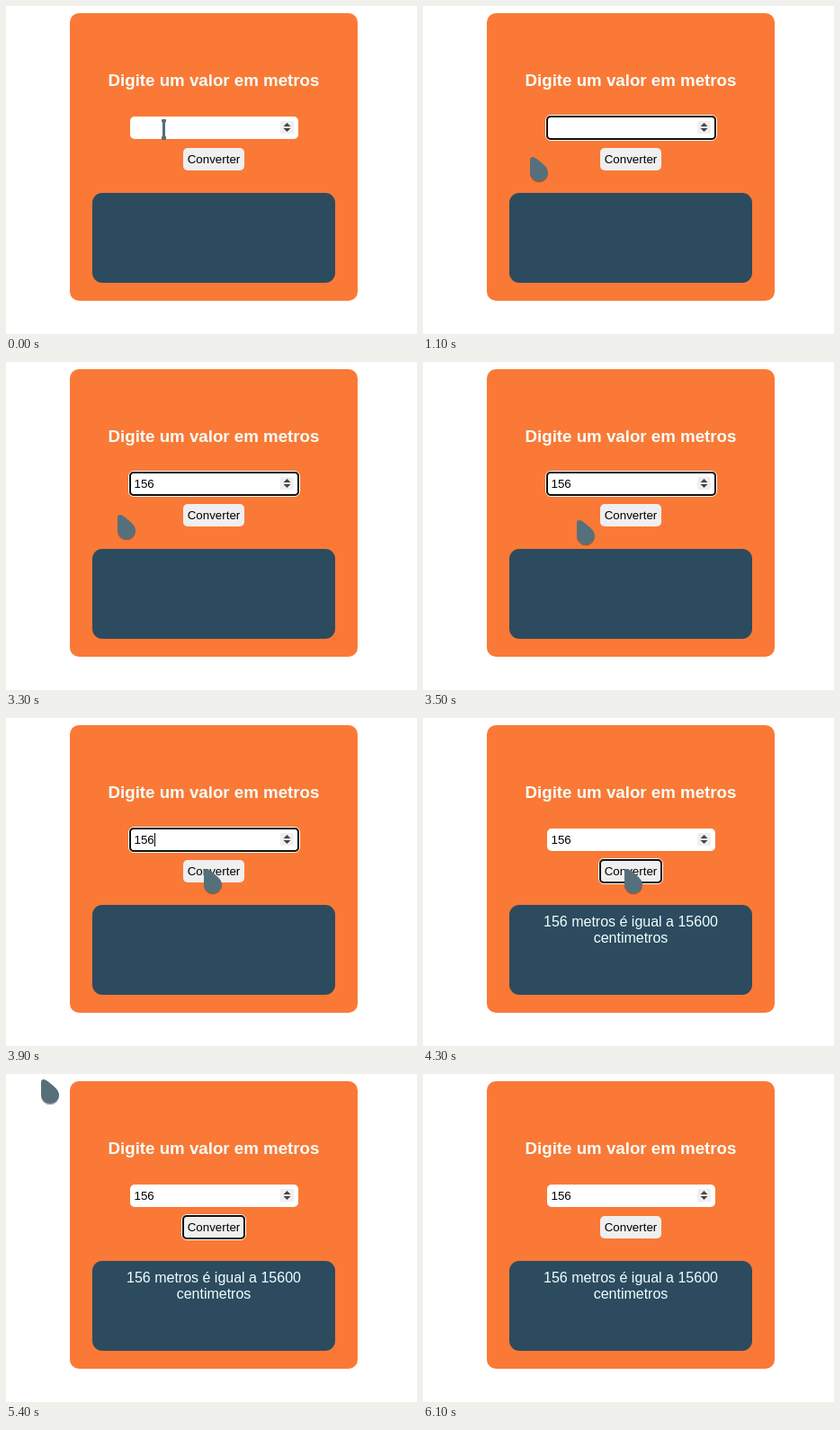
Write an HTML page that moves like this. It is 457 by 365 pixels and loops after 6300 ms.

```html
<!DOCTYPE html>
<html lang="pt">
<head>
<meta charset="utf-8">
<title>Conversor de metros</title>
<style>
  html, body { margin: 0; width: 100%; height: 100%; overflow: hidden; background: #fff; }
  svg { display: block; width: 457px; height: 365px; }
  text { font-family: "Liberation Sans", Arial, sans-serif; font-size: 13.333px; }
  .mid { text-anchor: middle; }
  .title { font-size: 18.72px; font-weight: bold; fill: #f5fffa; }
  .result { font-size: 16px; fill: #f0ffff; }
  .halo { fill: none; stroke: #fff; stroke-width: 1; }
  .ring { fill: none; stroke: #101010; stroke-width: 2; }
</style>
</head>
<body>
<svg viewBox="0 0 457 365">
  <rect x="71" y="8" width="320" height="320" rx="10" fill="#fa7936"/>
  <text class="mid title" x="231" y="89">Digite um valor em metros</text>

  <rect x="138" y="123" width="187" height="25" rx="5" fill="#fff"/>
  <rect x="305" y="128" width="15" height="14" rx="1" fill="#efefef"/>
  <path d="M308.5 134 L312.5 130 L316.5 134Z M308.5 136 L312.5 140 L316.5 136Z" fill="#444"/>
  <text id="value" x="142.5" y="140"></text>
  <rect id="caret" y="128" width="1" height="15"/>
  <g id="inputFocus">
    <rect class="halo" x="136.5" y="121.5" width="190" height="28" rx="5.5"/>
    <rect class="ring" x="138" y="123" width="187" height="25" rx="4"/>
  </g>

  <rect x="197" y="158" width="68" height="25" rx="5" fill="#efefef"/>
  <g id="buttonFocus">
    <rect class="halo" x="195.5" y="156.5" width="71" height="28" rx="5.5"/>
    <rect class="ring" x="197" y="158" width="68" height="25" rx="4"/>
  </g>
  <text class="mid" x="231" y="175">Converter</text>

  <rect x="96" y="208" width="270" height="100" rx="11" fill="#2c4b5f"/>
  <g id="result">
    <text class="mid result" x="231" y="232">156 metros é igual a 15600</text>
    <text class="mid result" x="231" y="250">centimetros</text>
  </g>

  <g id="beam" fill="#50707c">
    <rect x="-1.5" y="-10" width="3" height="20"/>
    <rect x="-2.5" y="-11" width="5" height="3.5" rx="1" fill="#5f6b6e"/>
    <rect x="-2.5" y="8" width="5" height="4" rx="1" fill="#5f6b6e"/>
  </g>
  <g id="drop">
    <path id="shadow" transform="translate(0 1.3)" fill="#203038" opacity=".4"/>
    <path id="body" fill="#56707b"/>
  </g>
</svg>
<script>
const LOOP = 6300;
const el = id => document.getElementById(id);
const show = (id, on) => el(id).setAttribute('visibility', on ? 'visible' : 'hidden');
const place = (id, x, y) => el(id).setAttribute('transform', `translate(${x} ${y})`);
const within = (t, a, b) => t >= a && t < b;

const dropPath = 'M1 3 Q1 0 4 0 Q7 .3 15 7.5 Q21 12.5 21 17.5 A10 9.5 0 0 1 1 17.5Z';
el('body').setAttribute('d', dropPath);
el('shadow').setAttribute('d', dropPath);

// Pointer positions, each held until the next: [time, x, y]
const beamSteps = [[0, 175.5, 137], [900, 161, 139]];
const dropSteps = [
  [1000, 128, 161], [1100, 118, 168],
  [3300, 123, 170], [3400, 145, 174], [3500, 170, 176], [3600, 195, 174], [3700, 211, 169],
  [3900, 219, 168], [4000, 223, 168],
  [4900, 190, 181], [5000, 118, 171], [5100, 53, 128], [5200, 37, 82],
  [5300, 35, 40], [5400, 38, 6]
];
const held = (steps, t) => steps.filter(s => s[0] <= t).pop();

const typed = [2200, 2400, 2700];

function draw(t) {
  const count = typed.filter(k => t >= k).length;
  el('value').textContent = '156'.slice(0, count);
  el('caret').setAttribute('x', Math.round(142.9 + count * 7.415));
  show('caret', within(t, 500, 1100) || within(t, 1700, 3300) || within(t, 3900, 4200));
  show('inputFocus', within(t, 500, 4200));
  show('buttonFocus', within(t, 4200, 6100));
  show('result', t >= 4300);

  const isBeam = t < 1000;
  show('beam', isBeam);
  show('drop', within(t, 1000, 5500));
  const [, x, y] = held(isBeam ? beamSteps : dropSteps, t);
  place(isBeam ? 'beam' : 'drop', x, y);
}

function tick() {
  draw(performance.now() % LOOP);
  requestAnimationFrame(tick);
}
draw(0);
requestAnimationFrame(tick);
</script>
</body>
</html>
```
